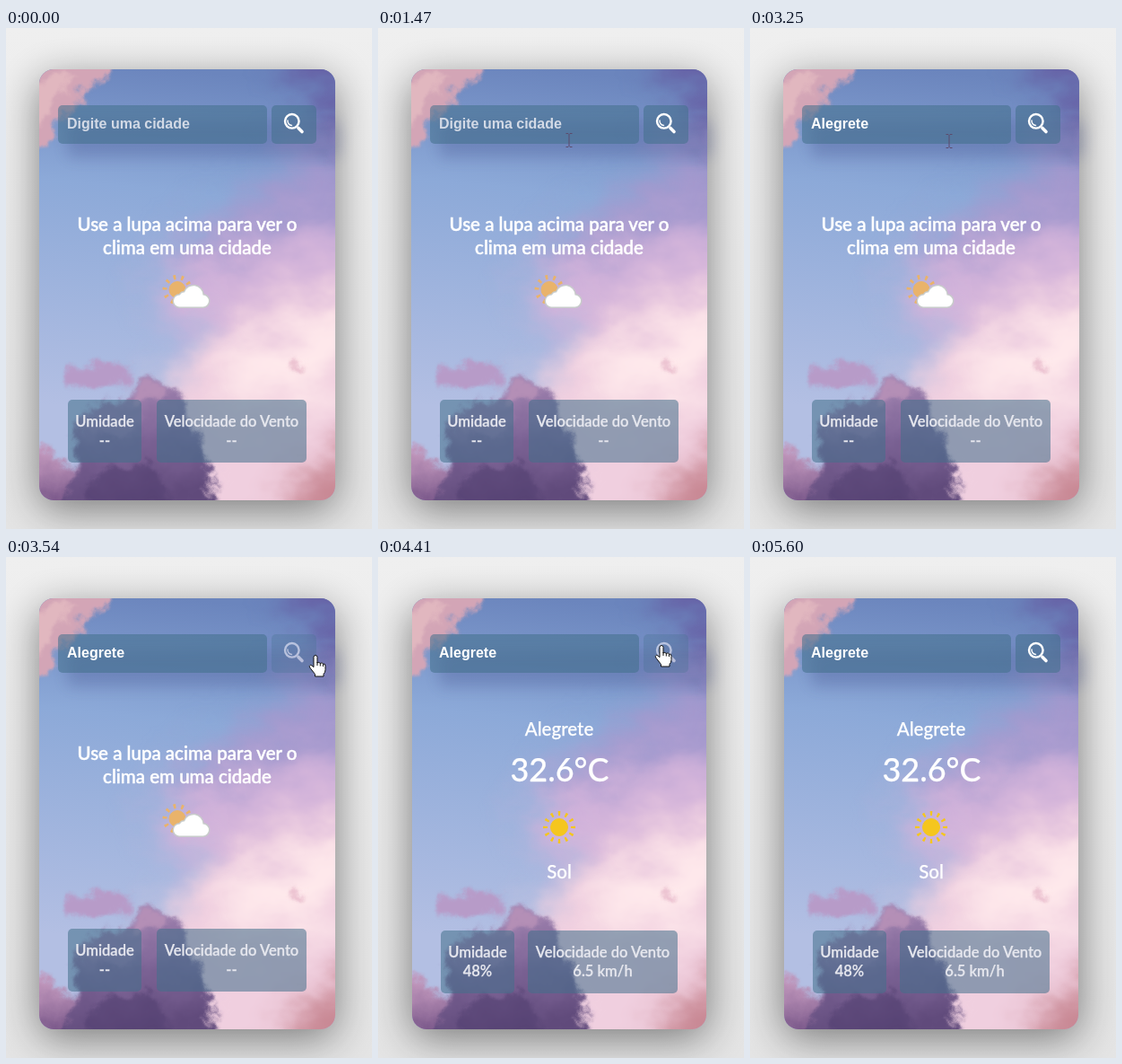
An HTML page for the animation above (6.13 s loop, 408x558 px).

```html
<!DOCTYPE html>
<html lang="pt-BR">
<head>
<meta charset="utf-8">
<title>Clima</title>
<style>
html, body { margin: 0; width: 100%; height: 100%; overflow: hidden; background: #eee; }
svg { display: block; width: 408px; height: 558px; }
text { font: 500 20.5px Lato, "Open Sans", sans-serif; fill: #fff; stroke: #fff; stroke-width: .25px; text-anchor: middle; }
#intro text { stroke-width: .5px; }
.stat text { font-size: 16.5px; font-weight: 600; fill: #e6e7ee; stroke: #e6e7ee; }
.panel { fill: rgb(67 112 138 / .55); }
#temp { font-size: 36px; }
#field { font: bold 16px "Liberation Sans", Arial, sans-serif; stroke: none; text-anchor: start; }
.cursor { fill: #fff; stroke: #111; stroke-width: 1; stroke-linejoin: round; }
</style>
</head>
<body>
<svg viewBox="0 0 408 558">
  <defs>
    <linearGradient id="page" x2="0" y2="1"><stop stop-color="#efefef"/><stop offset="1" stop-color="#e4e4e4"/></linearGradient>
    <linearGradient id="sky" gradientUnits="userSpaceOnUse" x1="190" y1="46" x2="150" y2="430">
      <stop stop-color="#6b85bd"/><stop offset=".35" stop-color="#8ca9d8"/><stop offset="1" stop-color="#b3bfe3"/>
    </linearGradient>
    <linearGradient id="dark" gradientUnits="userSpaceOnUse" x1="150" y1="385" x2="170" y2="526">
      <stop stop-color="#aa8bb6"/><stop offset=".5" stop-color="#7e6597"/><stop offset="1" stop-color="#604a7b"/>
    </linearGradient>
    <linearGradient id="low" x2="0" y2="1"><stop stop-color="#c59bbf"/><stop offset="1" stop-color="#704f83"/></linearGradient>
    <clipPath id="card"><rect id="shape" x="37" y="46" width="330" height="480" rx="16"/></clipPath>
    <filter id="shadow" filterUnits="userSpaceOnUse" x="-80" y="-40" width="570" height="720"><feGaussianBlur stdDeviation="23"/></filter>
    <filter id="glow" filterUnits="userSpaceOnUse" x="30" y="60" width="378" height="140"><feGaussianBlur stdDeviation="8"/></filter>
    <filter id="haze" filterUnits="userSpaceOnUse" x="-40" y="-40" width="500" height="680" color-interpolation-filters="sRGB">
      <feGaussianBlur stdDeviation="22" result="b"/>
      <feTurbulence type="fractalNoise" baseFrequency=".014 .022" numOctaves="4" seed="8"/>
      <feDisplacementMap in="b" scale="70" xChannelSelector="R" yChannelSelector="G"/>
    </filter>
    <filter id="puff" filterUnits="userSpaceOnUse" x="-10" y="0" width="430" height="580" color-interpolation-filters="sRGB">
      <feGaussianBlur stdDeviation="2.5" result="b"/>
      <feTurbulence type="fractalNoise" baseFrequency=".04" numOctaves="4" seed="5"/>
      <feDisplacementMap in="b" scale="28" xChannelSelector="R" yChannelSelector="G"/>
    </filter>
  </defs>

  <rect width="408" height="558" fill="url(#page)"/>
  <rect x="37" y="58" width="330" height="478" rx="16" opacity=".47" filter="url(#shadow)"/>

  <g clip-path="url(#card)">
    <rect width="408" height="558" fill="url(#sky)"/>
    <g filter="url(#haze)">
      <path fill="#665fa4" d="M300 0H460V160L370 130Z"/>
      <path fill="#a398cd" d="M460 130L340 130 270 190 190 250 260 300H460Z"/>
      <path fill="#d3b3da" d="M460 215L330 220 260 250 160 265 180 325 460 380Z"/>
      <path fill="#f0cfdf" d="M460 270L310 290 230 340 170 385 190 600H460Z"/>
      <path fill="#ffeaec" d="M420 310L310 325 250 380 240 410 350 420Z"/>
      <path fill="#c98995" d="M460 430L340 480 270 600H460Z"/>
    </g>
    <g filter="url(#puff)">
      <path fill="#d3a5b6" d="M10 20H118L106 62 82 72 78 92 58 100 50 130 10 140Z"/>
      <path fill="#e5bcc2" opacity=".8" d="M20 56L80 54 68 74 48 84 40 108H20Z"/>
      <path fill="#b79bc8" d="M66 396Q70 368 98 372 122 368 148 386 124 400 96 404Z"/>
      <path fill="#e9bdcd" d="M312 378Q320 370 334 376L322 382Z"/>
      <path fill="url(#low)" d="M10 470Q50 462 72 488L130 540H10Z"/>
      <path fill="url(#dark)" d="M58 545L82 490 70 456 94 426 124 416 142 396 164 388 188 404 204 430 216 452 222 486 230 508 226 545Z"/>
      <path fill="#c79bbd" opacity=".55" d="M142 402Q160 386 184 406L170 416 154 410 146 420Z"/>
      <path fill="#9a7cab" opacity=".6" d="M84 440Q106 420 130 436L150 428 142 452 114 462Z"/>
      <path fill="#513f70" opacity=".55" d="M86 530L106 490 146 482 172 500 180 535Z"/>
    </g>
  </g>

  <rect x="68" y="104" width="304" height="40" rx="8" fill="#3c4a88" opacity=".27" filter="url(#glow)"/>
  <rect class="panel" x="58" y="86" width="233" height="43" rx="5"/>
  <text id="field" x="68" y="112"></text>
  <path id="caret" stroke="#fff" d="M0 98V115"/>

  <g id="button">
    <rect class="panel" x="296" y="86" width="50" height="43" rx="5"/>
    <g fill="none" stroke="#fff" stroke-linecap="round">
      <circle cx="318.8" cy="103.8" r="7.8" stroke-width="2.4"/>
      <path stroke-width="1.4" d="M314 103A5 5 0 0 0 318.500 108.500"/>
      <path stroke-width="3.6" d="M326 111.500L330 115.500"/>
    </g>
  </g>

  <g id="intro">
    <text x="202" y="226">Use a lupa acima para ver o</text>
    <text x="202" y="252">clima em uma cidade</text>
    <g fill="#e9b36b" stroke="#e9b36b">
      <circle cx="191" cy="291.500" r="9"/>
      <circle cx="191" cy="291.500" r="14" fill="none" stroke-width="5" pathLength="10" stroke-dasharray=".3 .7"/>
    </g>
    <path fill="#fff" stroke="#c8cccb" stroke-width="3" paint-order="stroke" stroke-linejoin="round"
      d="M193 310.500a6.500 6.500 0 0 1 1-13a5 5 0 0 1 5-3a10.500 10.500 0 0 1 20.500 3a6.500 6.500 0 0 1 0 13z"/>
  </g>

  <g id="result">
    <text x="202" y="199">Alegrete</text>
    <text id="temp" x="202.500" y="250">32.6°C</text>
    <g fill="#f5c61e" stroke="#f5c61e">
      <circle cx="202" cy="301" r="9.500"/>
      <circle cx="202" cy="301" r="15.500" fill="none" stroke-width="5" pathLength="12" stroke-dasharray=".3 .7" stroke-dashoffset=".15"/>
    </g>
    <text x="202" y="358">Sol</text>
  </g>

  <g class="stat" id="humidity">
    <rect class="panel" x="69" y="414" width="82" height="70" rx="5"/>
    <text x="110" y="444">Umidade</text><text x="110" y="465"></text>
  </g>
  <g class="stat" id="wind">
    <rect class="panel" x="168" y="414" width="167" height="70" rx="5"/>
    <text x="251.500" y="444">Velocidade do Vento</text><text x="251.500" y="465"></text>
  </g>

  <path id="arrow" class="cursor" d="M0 0V16.500L3.900 12.900 6.500 18.700 9 17.600 6.500 11.900H11.800Z"/>
  <path id="beam" fill="none" stroke="#5c4a6c" d="M-3.500-7.500H-1L0-6.500 1-7.500H3.500M0-6.500V6.500M-3.500 7.500H-1L0 6.500 1 7.500H3.500"/>
  <path id="hand" class="cursor" d="M-2 1.500q0-2 2-2t2 2v6.500q2-1.500 3.300.4q2-1.300 3.200.6q2.500-.6 2.500 2.500v4q0 3-2 5v2.500h-9.500v-2.500l-5.500-7q-1.600-2.600.4-3.200q1.400 0 3.600 2.400zM2 7v4M5.300 8v3.500M8.500 9v3"/>
</svg>
<script>
const LOOP = 6130, STEP = 70, CITY = 'Alegrete';
const $ = id => document.getElementById(id);
const show = (el, on) => el.style.display = on ? '' : 'none';

// Mouse strokes as [time, x, y]; times lie on the STEP grid from each start
const strokes = [
  [[110, 368, 504], [180, 338, 410], [250, 310, 330], [390, 260, 215], [530, 228, 150], [670, 213, 125]],
  [[3250, 222, 126], [3320, 262, 129], [3390, 312, 126], [3460, 350, 119], [3530, 345, 110], [3670, 327, 103], [3810, 316, 99]],
  [[4760, 322, 108], [4830, 332, 142], [4900, 352, 206], [4970, 378, 296], [5040, 400, 387], [5180, 398, 466], [5320, 392, 502], [5600, 392, 562]]
];

function pointer(t) {
  const path = strokes.filter(s => s[0][0] <= t).pop();
  if (!path) return null;
  const start = path[0][0], last = path[path.length - 1];
  if (t >= last[0]) return last.slice(1);
  t = start + Math.floor((t - start) / STEP) * STEP;
  const i = path.findIndex(p => p[0] > t), a = path[i - 1], b = path[i];
  const k = (t - a[0]) / (b[0] - a[0]);
  return [a[1] + (b[1] - a[1]) * k, a[2] + (b[2] - a[2]) * k];
}

function typed(t) {
  if (t < 1600) return 0;
  if (t < 1860) return 1;
  if (t >= 2520) return 8;
  return Math.min(7, 2 + Math.floor((t - 1860) / 118));
}

const caretOn = t => t >= 940 && t < 1470 || t >= 1600 && t < 3050 || t >= 3580 && t < 4010;
const inside = ([x, y], left, right) => x >= left && x <= right && y >= 86 && y <= 129;

function setStat(id, dx, value, done) {
  $(id).setAttribute('transform', done ? `translate(${dx} 2)` : '');
  $(id).lastElementChild.textContent = done ? value : '--';
}

function draw(t) {
  const n = typed(t), done = t >= 4410, field = $('field'), caret = $('caret');
  field.textContent = n ? CITY.slice(0, n) : 'Digite uma cidade';
  field.style.fill = n ? '#fff' : '#d3dae6';
  const x = n ? 68 + Math.round(field.getComputedTextLength()) : 68;
  caret.setAttribute('transform', `translate(${x + .5})`);
  show(caret, caretOn(t));

  show($('intro'), !done);
  show($('result'), done);
  setStat('humidity', 1, '48%', done);
  setStat('wind', -1, '6.5 km/h', done);
  $('shape').setAttribute('x', done ? 38 : 37);
  $('shape').setAttribute('width', done ? 328 : 330);

  const p = pointer(t);
  const kind = !p ? '' : inside(p, 296, 346) ? 'hand' : inside(p, 58, 291) ? 'beam' : 'arrow';
  $('button').style.opacity = kind === 'hand' ? .5 : 1;
  for (const id of ['arrow', 'beam', 'hand']) {
    show($(id), id === kind);
    if (id === kind) $(id).setAttribute('transform', `translate(${p})`);
  }
}

const begin = performance.now();
function tick() {
  draw((performance.now() - begin) % LOOP);
  requestAnimationFrame(tick);
}
tick();
</script>
</body>
</html>
```
